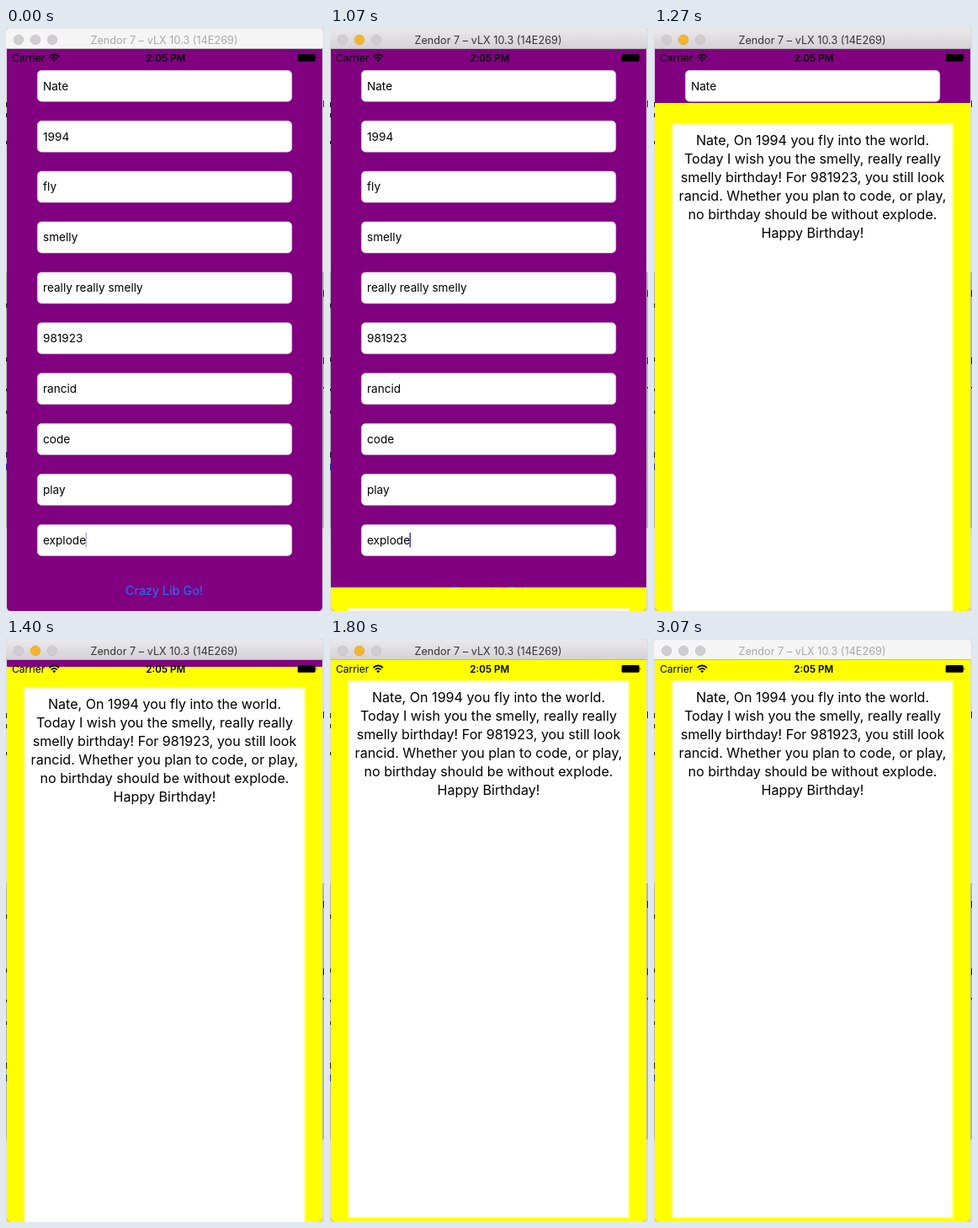
An HTML page that plays this animation: 378 px wide and 692 px high, repeating every 3.14 s.

```html
<!DOCTYPE html>
<html lang="en">
<head>
<meta charset="utf-8">
<title>Birthday form</title>
<style>
  html, body { margin: 0; width: 100%; height: 100%; overflow: hidden; background: #d4d4d4; }
  svg { display: block; width: 378px; height: 692px; }
  text { font-family: Inter, Roboto, sans-serif; }
  .mid { text-anchor: middle; }
  #fields text { font-size: 13.6px; }
  #letter text { font-size: 16.1px; }
</style>
</head>
<body>
<svg viewBox="0 0 378 692">
  <defs>
    <linearGradient id="chrome" x2="0" y2="1">
      <stop stop-color="#ebe9eb"/><stop offset="1" stop-color="#d3d1d3"/>
    </linearGradient>
    <clipPath id="screen"><path d="M1 25H376V687Q376 692 371 692H6Q1 692 1 687Z"/></clipPath>
  </defs>

  <!-- Slivers of the desktop beside the window -->
  <rect width="378" height="692" fill="#dcdcdc"/>
  <path d="M0 290h378v304H0z" fill="#b4b4b4"/>
  <path d="M0 88v6M0 101v5M0 134v4M0 327v5M0 391v5M0 428v3M0 454v4M0 503v7M378 86v8M378 311v8M378 391v8M378 426v2" stroke="#222" stroke-width="2"/>
  <path d="M0 517v8" stroke="#2636a0" stroke-width="2"/>

  <g clip-path="url(#screen)">
    <rect y="25" width="378" height="667" fill="#800080"/>
    <g id="fields"></g>
    <rect id="caret" x="94.5" y="599" width="1.5" height="17.5" fill="#4338d8"/>
    <text id="go" class="mid" x="188" y="673" font-size="14.4" fill="#2274ff">Crazy Lib Go!</text>
    <g id="sheet">
      <rect y="25" width="378" height="667" fill="#ff0"/>
      <rect x="22" y="50" width="333" height="636.5" fill="#fff" stroke="#ffff9c" stroke-width="1.5"/>
      <g id="letter"></g>
    </g>
    <text x="7" y="39.5" font-size="12">Carrier</text>
    <path d="M51.5 34.2q5.7-5.4 11.4 0M53.6 36.5q3.6-3.4 7.2 0" fill="none" stroke="#000" stroke-width="1.7"/>
    <path d="M57.2 40.2l-2-2.2q2-1.6 4 0z"/>
    <text class="mid" x="189.7" y="39.5" font-size="11.6" font-weight="600">2:05 PM</text>
    <rect x="346.7" y="31" width="21" height="8.7" rx="1.5"/>
    <path d="M368.6 33.7q1.8 1.6 0 3.3z"/>
  </g>

  <path id="bar" d="M0 25V5Q0 .5 5 .5H372Q377 .5 377 5V25Z"/>
  <path d="M0 24.5H377" stroke="#b9b7b9"/>
  <g stroke-width=".6">
    <circle cx="15" cy="14" r="5.8" fill="#cfcdcf" stroke="#bdbbbd"/>
    <circle id="amber" cx="35" cy="14" r="5.8"/>
    <circle cx="55" cy="14" r="5.8" fill="#cfcdcf" stroke="#bdbbbd"/>
  </g>
  <text id="title" class="mid" x="188" y="19" font-size="12.7">Zendor 7 – vLX 10.3 (14E269)</text>
</svg>
<script>
const LOOP = 3140;
const $ = id => document.getElementById(id);
const set = (id, attrs) => {
  for (const key in attrs) $(id).setAttribute(key, attrs[key]);
};

const answers = ['Nate', '1994', 'fly', 'smelly', 'really really smelly',
  '981923', 'rancid', 'code', 'play', 'explode'];
$('fields').innerHTML = answers.map((word, i) => {
  const y = 50.3 + i * 59.9;
  return `<rect x="37.3" y="${y}" width="302.5" height="37" rx="5" fill="#fff" stroke="#d9c4d9" stroke-width=".5"/>
    <text x="44" y="${y + 23.3}">${word}</text>`;
}).join('');

const [name, year, verb, adj, , number, look, work, fun, end] = answers;
$('letter').innerHTML = [
  `${name}, On ${year} you ${verb} into the world.`,
  `Today I wish you the ${adj}, really really`,
  `${adj} birthday! For ${number}, you still look`,
  `${look}. Whether you plan to ${work}, or ${fun},`,
  `no birthday should be without ${end}.`,
  'Happy Birthday!'
].map((line, i) => `<text class="mid" x="188.5" y="${74.7 + i * 22}">${line}</text>`).join('');

function snap(t) {
  const r = t % 200;
  return Math.min(3070, t - r + (r < 70 ? 0 : r < 130 ? 70 : 130));
}

const clamp = v => Math.max(0, Math.min(1, v));

// Critically damped spring from 667 px below its resting place
function sheetOffset(t) {
  const x = Math.max(0, t - 1052.4) * 0.01811;
  return Math.floor(667 * (1 + x) * Math.exp(-x));
}

function caretAlpha(t) {
  const p = (t + 50) % 1000;
  return p < 500 ? clamp(p / 120) : clamp((700 - p) / 200);
}

function draw(t) {
  const active = t >= 930 && t < 2930;
  set('bar', { fill: active ? 'url(#chrome)' : '#f5f5f5' });
  set('title', { fill: active ? '#353535' : '#a9a9a9' });
  set('amber', active
    ? { fill: '#f6b42e', stroke: '#d99c22' }
    : { fill: '#cfcdcf', stroke: '#bdbbbd' });
  set('caret', { opacity: caretAlpha(t) });
  set('go', { opacity: t >= 1000 ? 0.6 : 1 });
  set('sheet', { transform: `translate(0 ${sheetOffset(t)})` });
}

const start = performance.now();
function tick() {
  draw(snap((performance.now() - start) % LOOP));
  requestAnimationFrame(tick);
}
tick();
</script>
</body>
</html>
```
